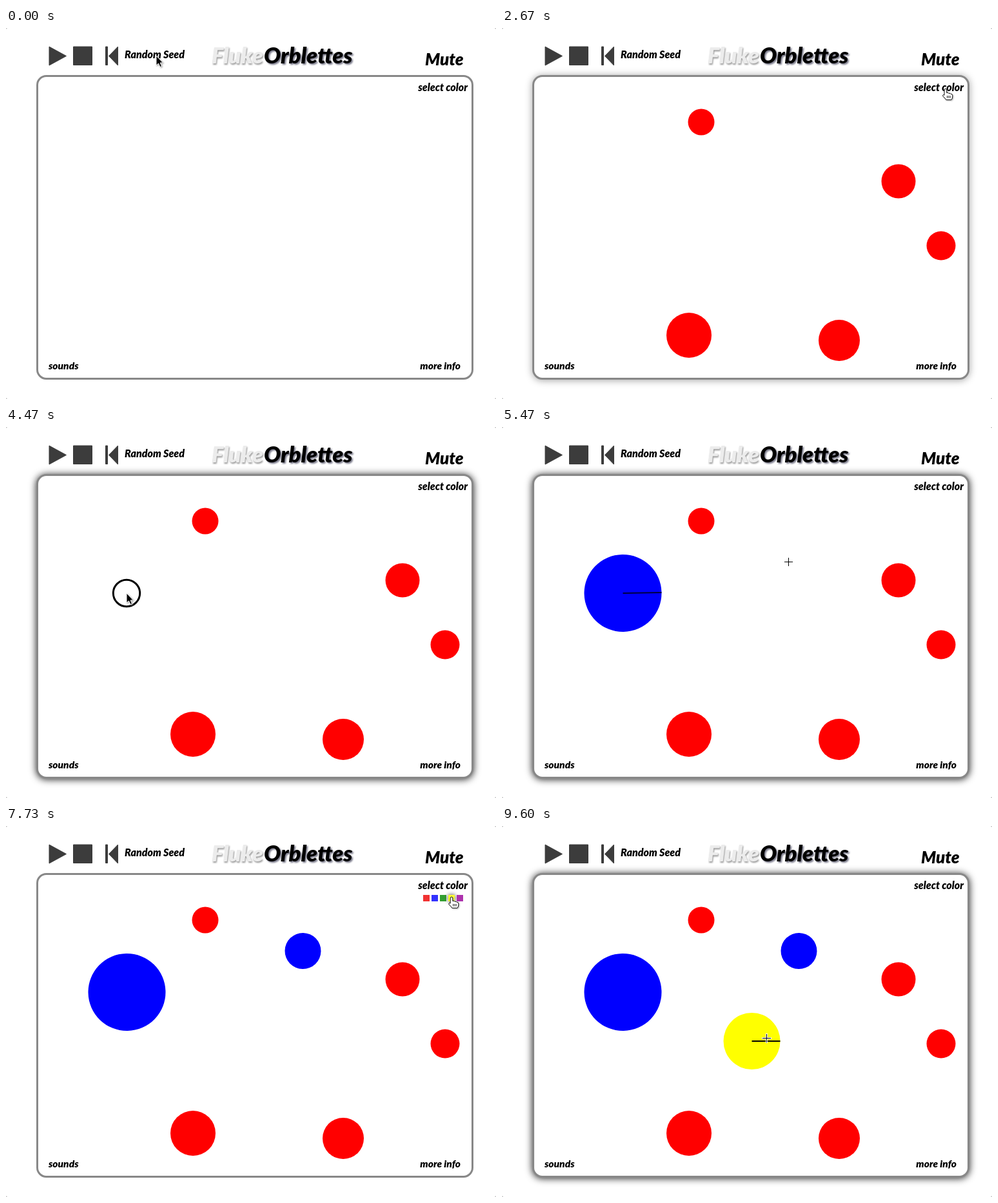
Write an HTML page that moves like this. It is 760x576 px and loops after 9.67 s.

```html
<!DOCTYPE html>
<html lang="en">
<head>
<meta charset="utf-8">
<title>Asteroid sound toy</title>
<style>
  html, body { margin: 0; width: 100%; height: 100%; overflow: hidden; background: #aaa; }
  svg { display: block; width: 760px; height: 576px; background: #fff; border-radius: 3px; }
  text { font: italic 900 16px Lato, sans-serif; }
  .title { font-size: 34.5px; }
  .pale { fill: #ececec; filter: drop-shadow(1px 2px 1px #999); }
  .dark { filter: drop-shadow(2px 2px 1px #778); }
  .corner { font-size: 15.5px; }
  .ring { fill: none; stroke: #000; stroke-width: 3; }
  .icons { fill: #3c3c3c; stroke: #3c3c3c; stroke-linejoin: round; }
</style>
</head>
<body>
<svg id="stage" viewBox="0 0 760 576">
  <g class="icons">
    <path d="M67 29L93.5 43.5L67 58Z"/>
    <path d="M104.5 29h29v28.5h-29Z"/>
    <path d="M154.5 29h3v28.5h-3ZM159.5 43.5L173.5 29V58Z"/>
  </g>
  <text id="seed" x="184" y="47">Random Seed</text>
  <text class="title pale" x="399" y="55" text-anchor="end">Fluke</text>
  <text class="title dark" x="400" y="55">Orblettes</text>
  <text x="650" y="58" style="font-size:26px">Mute</text>
  <rect id="panel" x="48.5" y="74.5" width="675" height="470" rx="14" fill="#fff" stroke="#888" stroke-width="3"/>
  <g id="rocks"></g>
  <text x="716" y="98" text-anchor="end">select color</text>
  <text class="corner" x="66" y="530">sounds</text>
  <text class="corner" x="705" y="530" text-anchor="end">more info</text>
  <g id="menu"></g>
  <g id="pointer">
    <circle id="ring" class="ring" r="20.7"/>
    <path id="arrow" d="M0 0V15L3.5 12L6 17.5L8.5 16.5L6.2 11H10.5Z" stroke="#fff" style="filter:drop-shadow(1px 1px 1px #999)"/>
    <path id="hand" transform="scale(.9)" d="M-2 9V0q0-2 2-2t2 2V5q3-1 3.5 1q3-1 3.5 1q3 0 3 2v3q0 3-2 5H1q-1-2-6-7q1-3 3-1ZM3 10v4M5.5 10v4M8 10v4" fill="#fff" stroke="#000" style="filter:drop-shadow(1px 1px 1px #999)"/>
    <g id="cross" fill="none">
      <path d="M-7 .5H8M.5 -7V8" stroke="#fff" stroke-width="3"/>
      <path d="M-6 .5H7M.5 -6V7" stroke="#000"/>
    </g>
  </g>
</svg>
<script>
const LOOP = 9670;
const $ = id => document.getElementById(id);
const clamp = v => Math.max(0, Math.min(1, v));
const smooth = v => (v = clamp(v), v * v * (3 - 2 * v));
const fade = (t, from, to, span = 300) => clamp((t - from) / span) - clamp((t - to) / span);

function add(parent, tag, attrs) {
  const el = document.createElementNS('http://www.w3.org/2000/svg', tag);
  for (const k in attrs) el.setAttribute(k, attrs[k]);
  return parent.appendChild(el);
}

// Seeded circles: appear, vanish, [x, y, r]...
const seeds = [
  [570, 1800, [110, 245, 27], [186, 354, 28]],
  [1800, LOOP, [309, 146, 20.5], [615, 238, 26.5], [681, 338, 22.5], [290, 477, 35], [523, 485, 32]]
].map(([from, to, ...list]) => {
  const group = add($('rocks'), 'g', { fill: '#f00' });
  list.forEach(([cx, cy, r]) => add(group, 'circle', { cx, cy, r }));
  return { from, to, group };
});

// Circles dragged out by the pointer, each with a radius line
const drawn = [
  { x: 187.5, y: 258, r: 60, from: 4500, to: 5150, color: '#00f', angle: -1 },
  { x: 460.5, y: 194, r: 28, from: 6000, to: 6700, color: '#00f', angle: 91 },
  { x: 387.5, y: 334, r: 44, from: 8350, to: 9550, color: '#ff0', angle: 0 }
].map(d => {
  const group = add($('rocks'), 'g', { transform: `translate(${d.x} ${d.y}) rotate(${d.angle})` });
  const disc = add(group, 'circle', { fill: d.color });
  const line = add(group, 'line', { stroke: '#000', 'stroke-width': 2 });
  return { ...d, disc, line };
});

// Swatches: color, hover start, hover end
const swatches = [
  ['#e00'], ['#00f', 3450, 3650], ['#080', 2950, 3350], ['#ff0', 7200, 7900], ['#909']
].map(([fill, from = LOOP, to = LOOP], i) => {
  const el = add($('menu'), 'rect', { x: 647 + i * 13, y: 107, width: 10, height: 10, fill });
  return { el, from, to };
});

// Pointer path: time, x, y, shape from then on
const path = [
  [0, 233, 43, 'arrow'], [350, 230, 39, 'hand'], [700, 230, 39, 'hand'],
  [1200, 224, 48, 'hand'], [1900, 224, 48, 'arrow'], [2250, 410, 170, 'arrow'],
  [2650, 688, 96, 'hand'], [3000, 678, 110, 'hand'], [3400, 662, 114, 'hand'],
  [3700, 662, 114, 'arrow'], [4250, 187, 258, 'arrow'], [4550, 187, 258, 'cross'],
  [5150, 217, 257, 'cross'], [5470, 444, 209, 'cross'], [5800, 460, 194, 'cross'],
  [6050, 460, 194, 'cross'], [6700, 460, 208, 'cross'], [7000, 691, 112, 'hand'],
  [7900, 691, 112, 'arrow'], [8300, 388, 334, 'arrow'], [8470, 392, 331, 'arrow'],
  [8600, 394, 331, 'cross'], [9550, 410, 329, 'cross'], [LOOP, 410, 329, 'cross']
];
const presses = [500, 3580, 4450, 5950, 7750, 8350];

function drawPointer(t) {
  const i = path.findIndex(p => p[0] > t) - 1;
  const [t0, x0, y0, shape] = path[i], [t1, x1, y1] = path[i + 1];
  const k = smooth((t - t0) / (t1 - t0));
  $('pointer').setAttribute('transform', `translate(${x0 + (x1 - x0) * k} ${y0 + (y1 - y0) * k})`);
  for (const id of ['arrow', 'hand', 'cross']) $(id).style.display = id === shape ? '' : 'none';
  $('ring').style.display = presses.some(p => t >= p && t < p + 250) ? '' : 'none';
}

function draw(t) {
  $('seed').setAttribute('fill', t > 350 && t < 1950 ? '#5a5a5a' : '#000');

  const glow = fade(t, 2150, 2500) + fade(t, 3750, 7120) + fade(t, 8060, 2 * LOOP);
  $('panel').style.filter = glow ? `drop-shadow(0 1px 6px rgba(0,0,0,${0.85 * glow}))` : 'none';

  for (const s of seeds) s.group.style.display = t >= s.from && t < s.to ? '' : 'none';

  for (const d of drawn) {
    const r = d.r * smooth((t - d.from) / (d.to - d.from));
    d.disc.setAttribute('r', r);
    d.line.setAttribute('x2', r);
    d.line.style.opacity = 1 - clamp((t - d.to - 200) / 500);
  }

  $('menu').style.opacity = 0.8 * (fade(t, 2700, 3650, 200) + fade(t, 7100, 7850, 200));
  for (const s of swatches) {
    s.el.style.filter = `drop-shadow(0 0 3px rgba(0,0,0,${fade(t, s.from, s.to)}))`;
  }

  drawPointer(t);
}

function tick() {
  draw(performance.now() % LOOP);
  requestAnimationFrame(tick);
}
tick();
</script>
</body>
</html>
```
